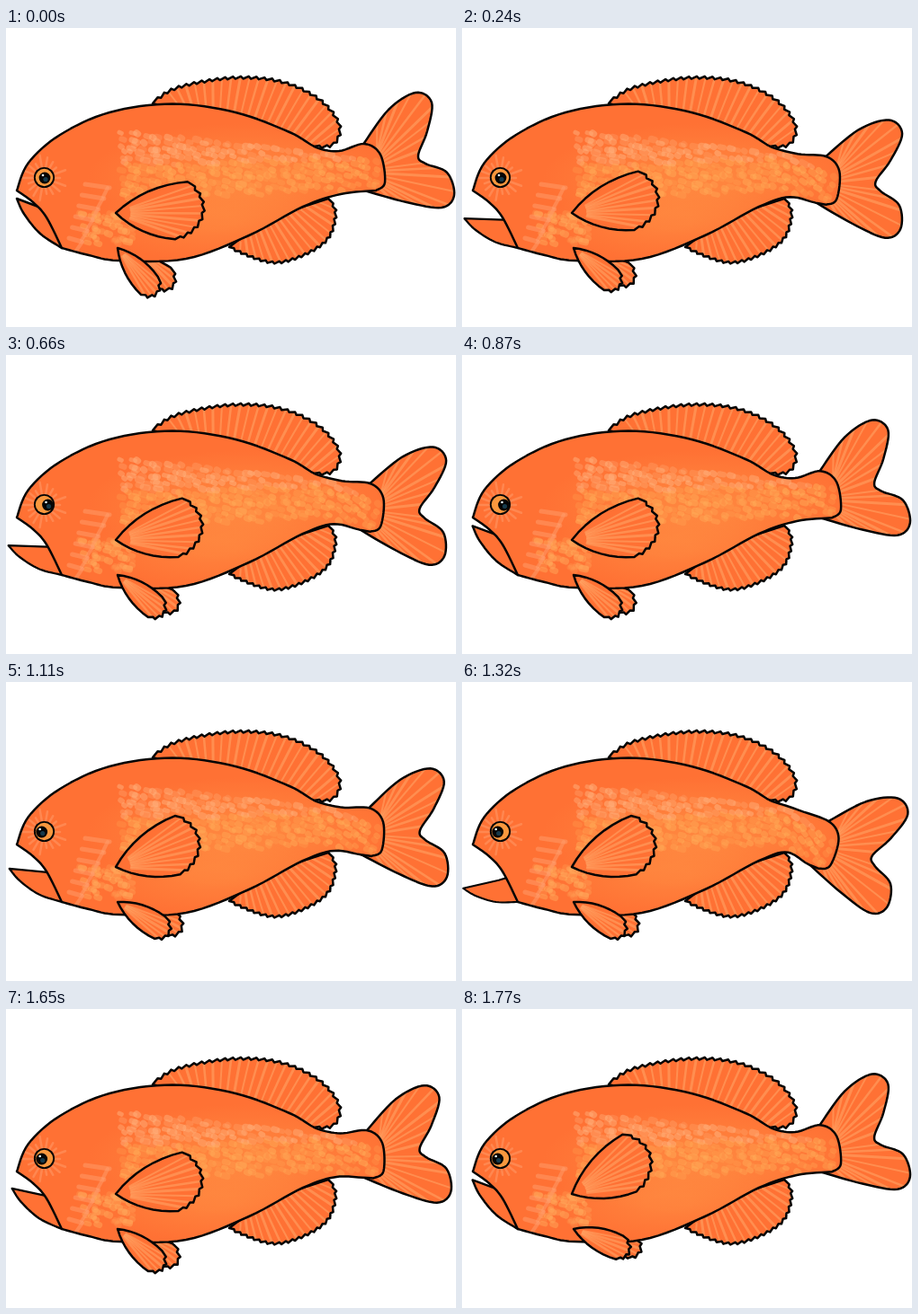
These frames come from a looping animation (500x333 px, 1800 ms). An HTML page with a canvas:

```html
<!DOCTYPE html>
<html lang="en">
<head>
<meta charset="utf-8">
<title>Swimming fish</title>
<style>
  html, body { margin: 0; width: 100%; height: 100%; overflow: hidden; background: #fff; }
  canvas { display: block; width: 500px; height: 333px; }
</style>
</head>
<body>
<canvas id="stage" width="500" height="333"></canvas>
<script>
const ctx = document.getElementById('stage').getContext('2d');
const STEP = 30, FRAMES = 60, RAD = Math.PI / 180;
const SKIN = '#ff7134', INK = '#050505', RAY = 'rgba(255,172,108,.5)';

const mix = (a, b, u) => a + (b - a) * u;
const polar = (x, y, r, a) => [x + r * Math.cos(a), y + r * Math.sin(a)];

// Smooth curve through a few key points, as a dense polyline.
function spline(keys) {
  const pts = keys.split(' ').map(p => p.split(',').map(Number));
  const at = i => pts[Math.max(0, Math.min(pts.length - 1, i))];
  const out = [];
  for (let i = 0; i < pts.length - 1; i++) {
    const [a, b, c, d] = [at(i - 1), at(i), at(i + 1), at(i + 2)];
    for (let t = 0; t < 1; t += 0.125) {
      out.push([0, 1].map(k => b[k] + t / 2 * (c[k] - a[k] +
        t * (2 * a[k] - 5 * b[k] + 4 * c[k] - d[k] + t * (3 * (b[k] - c[k]) + d[k] - a[k])))));
    }
  }
  return [...out, pts[pts.length - 1]];
}

const BACK = spline('12,181 25,150 60,119 115,94 185,84.5 255,94 315,116 345,133 370,137 398,129 416,141 421,172 411,181');
const BELLY = spline('411,181 372,185 330,199 270,231 200,257 125,259 92,253 62,245');
const FACE = spline('62,245 45,211 30,194 12,181');
const JAW = spline('12,190 20,207 38,229 62,245');
const TAIL = spline('396,131 425,91 455,72 473,83 468,115 458,142 466,151 490,161 498,186 484,200 445,194 398,181');
const DORSAL = spline('163,84 190,67 250,56 305,60 348,80 370,108 364,129 342,132');
const ANAL = spline('358,190 366,208 352,240 300,261 248,244');

// Point at fraction u of a polyline, with its direction.
function along(pts, u) {
  const len = pts.slice(1).map((p, i) => Math.hypot(p[0] - pts[i][0], p[1] - pts[i][1]));
  let left = u * len.reduce((a, b) => a + b, 0), i = 0;
  while (i < len.length - 1 && left > len[i]) left -= len[i++];
  const [x, y] = pts[i], dx = (pts[i + 1][0] - x) / len[i], dy = (pts[i + 1][1] - y) / len[i];
  return [x + dx * left, y + dy * left, dx, dy];
}

function serrate(pts, count, depth) {
  const out = [pts[0]];
  for (let i = 1; i < count; i++) {
    for (const [shift, d] of [[0, depth], [0.3, -depth / 2]]) {
      const [x, y, dx, dy] = along(pts, (i + shift) / count);
      out.push([x + dy * d, y - dx * d]);
    }
  }
  return [...out, pts[pts.length - 1]];
}

// Rotates the rear of the body; the bend sets in from x = 340 to x = 400.
let bendAngle = 0;
function bend([x, y]) {
  const u = Math.min(1, Math.max(0, (x - 340) / 60));
  const a = bendAngle * u * u * (3 - 2 * u), c = Math.cos(a), s = Math.sin(a);
  const dx = x - 346, dy = y - 163;
  return [346 + dx * c - dy * s, 163 + dx * s + dy * c];
}

function line(a, b, color, width) {
  ctx.strokeStyle = color;
  ctx.lineWidth = width;
  ctx.beginPath();
  ctx.moveTo(...a);
  ctx.lineTo(...b);
  ctx.stroke();
}

function shape(pts, detail) {
  const path = new Path2D();
  pts.forEach(p => path.lineTo(...p));
  path.closePath();
  ctx.fillStyle = SKIN;
  ctx.fill(path);
  ctx.save();
  ctx.clip(path);
  detail();
  ctx.restore();
  ctx.strokeStyle = INK;
  ctx.lineWidth = 2.5;
  ctx.stroke(path);
}

function rays(count, base, tip) {
  for (let i = 0; i < count; i++) {
    const u = (i + 0.5) / count;
    line(base(u), tip(u), RAY, 2 + (i % 3) * 0.5);
  }
}

// Wedge-shaped fin: two bowed sides from a root and a ragged round rim.
function fan({ x, y, from, to, r0, r1, bulge, bow, teeth }, turn) {
  const a0 = (from + turn) * RAD, a1 = (to + turn) * RAD;
  const rim = u => polar(x, y, mix(r0, r1, u) + bulge * Math.sin(Math.PI * u), mix(a0, a1, u));
  const side = (a, r, dir) => Array.from({ length: 9 }, (_, i) =>
    polar(x, y, r * i / 8, a + dir * bow * RAD * (1 - i / 8)));
  const edge = serrate(Array.from({ length: 25 }, (_, i) => rim(i / 24)), teeth, 1.8);
  shape([...side(a0, r0, -1), ...edge, ...side(a1, r1, 1).reverse()], () =>
    rays(teeth, u => polar(x, y, r0 * 0.2, mix(a0, a1, u)), u => rim(mix(0.03, 0.97, u))));
}

const PECTORAL = { x: 122, y: 206, from: -23.5, to: 24, r0: 87, r1: 72, bulge: 17, bow: 20, teeth: 9 };
const PELVIC = { x: 124, y: 245, from: 35.5, to: 63.5, r0: 55, r1: 58, bulge: 10, bow: 20, teeth: 5 };
const PELVIC_BACK = { x: 150, y: 250, from: 27, to: 66, r0: 37, r1: 44, bulge: 11, bow: 5, teeth: 5 };

let seed = 11;
const rnd = () => (seed = (seed * 16807) % 2147483647) / 2147483647;

// Pale scale marks along the flank, and a small patch below the gill.
const marks = [];
function mark(x, y, green, blue) {
  marks.push({ x, y, w: 1 + rnd() * 4, size: 5 + rnd() * 3,
    color: `rgba(255,${green},${blue},${0.2 + rnd() * 0.35})` });
}
for (let x = 126; x < 412; x += 8) {
  const u = (x - 126) / 286;
  for (let y = mix(114, 146, u); y < mix(190, 174, u); y += 7) {
    const warm = y > mix(150, 142, u);
    mark(x + rnd() * 6, y + rnd() * 5, warm ? 172 : 178, warm ? 88 : 126);
  }
}
for (let i = 0; i < 50; i++) mark(80 + rnd() * 60, 206 + rnd() * 34, 170, 92);

function glow(x, y, rx, ry, alpha) {
  ctx.save();
  ctx.translate(x, y);
  ctx.scale(rx, ry);
  const g = ctx.createRadialGradient(0, 0, 0.2, 0, 0, 1);
  g.addColorStop(0, `rgba(255,152,72,${alpha})`);
  g.addColorStop(1, 'rgba(255,152,72,0)');
  ctx.fillStyle = g;
  ctx.fillRect(-1, -1, 2, 2);
  ctx.restore();
}

function drawCheek() {
  const pale = 'rgba(255,158,108,.5)';
  for (let i = 0; i < 6; i++) {
    const u = i / 5, x = mix(88, 70, u), y = mix(174, 234, u);
    line([x, y], [x + mix(27, 14, u), y + 4], pale, 5);
    line([x + 25 - 10 * u, y + 4], [x + 20 - 12 * u, y + 14], pale, 4);
  }
  for (let i = 0; i < 18; i++) {
    const a = i * 20 * RAD;
    line(polar(42, 167, 11, a), polar(42, 167, 18 + (i * 7 % 4) * 2.5, a), pale, 2.5);
  }
}

function drawBody() {
  shape([...[...BACK, ...BELLY].map(bend), ...FACE], () => {
    glow(265, 168, 175, 62, 0.5);
    glow(230, 215, 130, 45, 0.4);
    for (const m of marks) line(bend([m.x, m.y]), bend([m.x + m.w, m.y + 1]), m.color, m.size);
    drawCheek();
  });
}

function disc(x, y, r, color) {
  ctx.fillStyle = color;
  ctx.beginPath();
  ctx.arc(x, y, r, 0, 7);
  ctx.fill();
}

function drawEye(x) {
  disc(42.5, 166.5, 11.6, INK);
  disc(42.5, 166.5, 9.7, '#f9983e');
  disc(x, 167, 6.4, INK);
  disc(x + 1, 168.5, 2.6, '#163a4b');
  disc(x - 2, 164, 1.3, '#e8f4f6');
}

function drawJaw(swing) {
  ctx.save();
  ctx.translate(62, 245);
  ctx.rotate(-34 * RAD * swing);
  ctx.scale(1 - 0.16 * swing, 1 - 0.16 * swing);
  ctx.translate(-62, -245);
  shape([...JAW, [85, 240], [80, 214], [57, 207]], () => {});
  ctx.restore();
}

function drawTail() {
  shape(TAIL.map(bend), () => rays(18, u => bend([412, mix(136, 176, u)]),
    u => bend(along(TAIL, mix(0.06, 0.94, u)))));
}

const dorsalEdge = serrate(DORSAL, 32, 1.8), analEdge = serrate(ANAL, 22, 1.6);

function draw(frame) {
  const swing = (1 - Math.cos(frame * Math.PI / 15)) / 2;
  const beat = frame % 7, lift = Math.min(beat, 7 - beat);
  const look = frame < 15 ? 43 : frame < 30 ? 46.5 : 39.7;
  bendAngle = 26.5 * RAD * swing;

  ctx.fillStyle = '#fff';
  ctx.fillRect(0, 0, 500, 333);
  ctx.lineCap = ctx.lineJoin = 'round';

  shape([...dorsalEdge, [260, 110]], () => rays(22, u => [mix(192, 345, u), mix(90, 134, u)],
    u => along(DORSAL, mix(0.06, 0.87, u)).slice(0, 2)));
  shape([...analEdge, [290, 212]], () => rays(16, u => [mix(345, 258, u), mix(190, 240, u)],
    u => along(ANAL, mix(0.05, 0.95, u)).slice(0, 2)));
  drawTail();
  fan(PELVIC_BACK, -9 * lift);
  drawJaw(swing);
  drawBody();
  drawEye(look);
  fan(PELVIC, -9.3 * lift);
  fan(PECTORAL, -8.7 * lift);
}

function tick() {
  draw(Math.floor(performance.now() / STEP) % FRAMES);
  requestAnimationFrame(tick);
}
tick();
</script>
</body>
</html>
```
